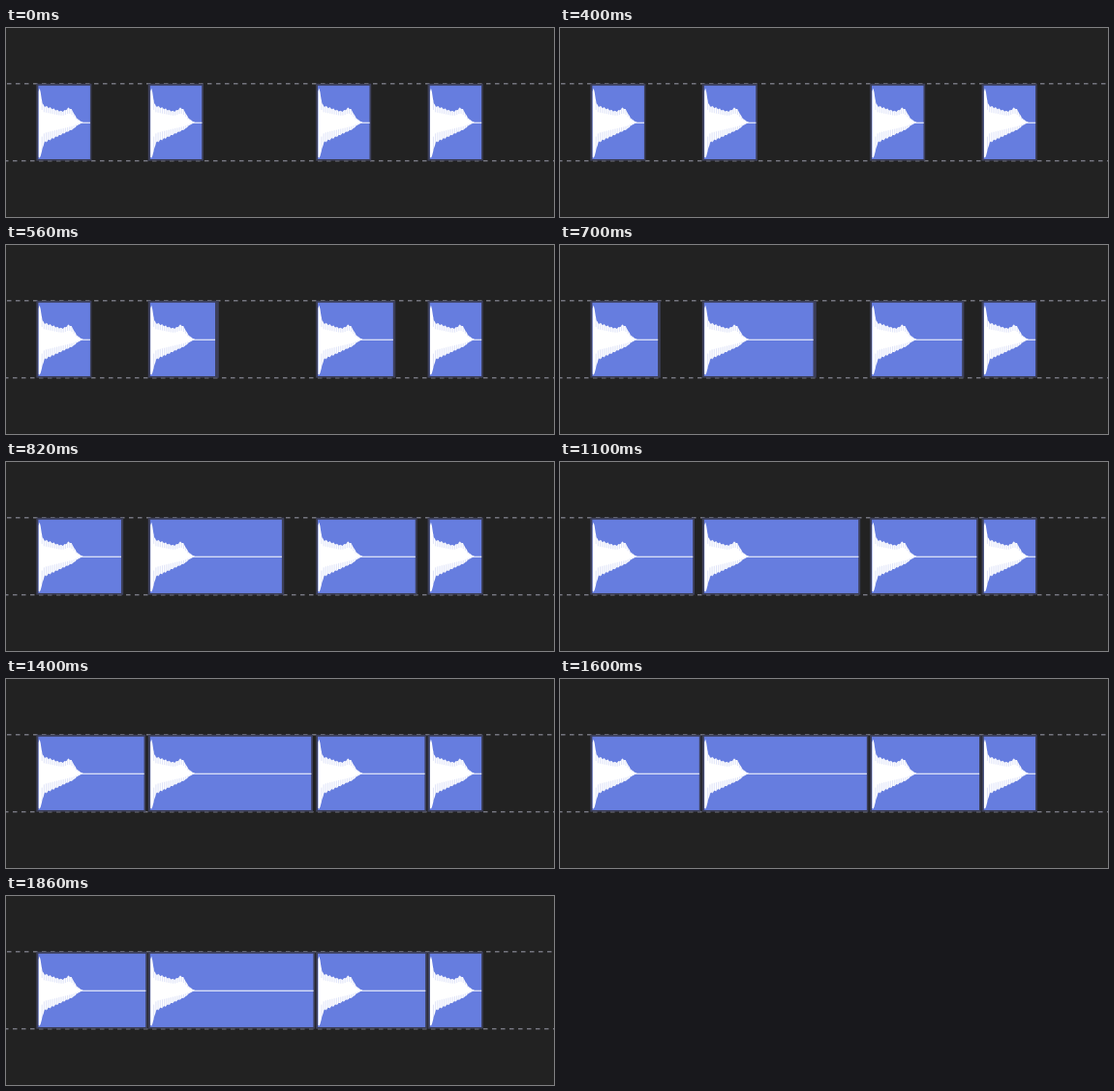
An HTML page for the animation above (2200 ms loop, 566x196 px).

```html
<!DOCTYPE html>
<html lang="en">
<head>
<meta charset="utf-8">
<title>Audio clips</title>
<style>
html, body { margin: 0; width: 100%; height: 100%; overflow: hidden; background: #222; }
svg { display: block; }
</style>
</head>
<body>
<svg id="stage" width="566" height="196" viewBox="0 0 566 196">
  <g stroke="#74757f" stroke-width="1.4" stroke-dasharray="4.5 4.5">
    <path d="M1 57.7H566"/>
    <path d="M-2 137.7H566"/>
  </g>
</svg>
<script>
const NS = 'http://www.w3.org/2000/svg';
const stage = document.getElementById('stage');
const LOOP = 2200, STEP = 20, SETTLED = 1860, LAG = 6;
const UNIT = 57.75, LEFT = 31, TOP = 59.5, HEIGHT = 76.5, MID = 98.2;
const BLUE = '#667ddf';

// slot: grid position, grow: extra units, start: when the stretch begins
const clips = [
  { slot: 0, grow: 1, start: 600 },
  { slot: 2, grow: 2, start: 500 },
  { slot: 5, grow: 1, start: 400 },
  { slot: 7, grow: 0, start: 0 }
];

function add(parent, tag, attrs) {
  const node = document.createElementNS(NS, tag);
  for (const key in attrs) node.setAttribute(key, attrs[key]);
  return parent.appendChild(node);
}

// Overdamped spring: soft start, long exponential settle
function spring(t) {
  const slow = 225, fast = 30;
  if (t <= 0) return 0;
  return 1 - (slow * Math.exp(-t / slow) - fast * Math.exp(-t / fast)) / (slow - fast);
}

// Drum hit: sharp attack, slow decay, a swell on the upper side
const bump = (x, centre, width) => Math.exp(-(((x - centre) / width) ** 2));
const taper = x => Math.max(0, Math.min(1, (47 - x) / 11));
const above = x => taper(x) * (20 - .34 * x + 16 * bump(x, 1, 2) + 6.5 * bump(x, 32, 5));
const below = x => taper(x) * (24 - .48 * x + 13 * bump(x, 1, 3));

function wavePath() {
  const upper = [], lower = [];
  for (let x = 0; x <= 50; x++) {
    const ripple = x > 3 ? .96 + .05 * Math.sin(x * 1.7) : 1;
    upper.push(`${x} ${-Math.max(.5, above(x) * ripple)}`);
    lower.unshift(`${x} ${Math.max(.5, below(x) * ripple)}`);
  }
  return `M${upper.join('L')}L170 -.5V.5L${lower.join('L')}Z`;
}

function groovePath() {
  let d = '';
  for (let x = 3.5; x < 42; x += 2.2) {
    d += `M${x} ${-above(x)}v${above(x) * .4}M${x} ${below(x) * .5}V${below(x)}`;
  }
  return d;
}

const wave = wavePath(), grooves = groovePath();
for (const clip of clips) {
  const x = LEFT + clip.slot * UNIT;
  clip.frame = add(stage, 'rect', { x: x + .3, y: 57.7, height: 80, fill: '#3c3f59' });
  clip.body = add(stage, 'svg', { x: x + 2.2, y: TOP, height: HEIGHT, overflow: 'hidden' });
  add(clip.body, 'rect', { width: '100%', height: HEIGHT, fill: BLUE });
  const art = add(clip.body, 'g', { transform: `translate(.5 ${MID - TOP})` });
  add(art, 'path', { d: wave, fill: '#fff' });
  add(art, 'path', { d: grooves, stroke: BLUE, 'stroke-width': .7, opacity: .3 });
}

function draw(time) {
  const t = Math.min(SETTLED, Math.floor((time % LOOP) / STEP) * STEP);
  for (const clip of clips) {
    const width = at => UNIT * (1 + clip.grow * spring(at - clip.start));
    clip.frame.setAttribute('width', width(t) - .6);
    clip.body.setAttribute('width', width(t - LAG) - 4);
  }
}

let origin = null;
function tick(now) {
  if (origin === null) origin = now;
  draw(now - origin);
  requestAnimationFrame(tick);
}
draw(0);
requestAnimationFrame(tick);
</script>
</body>
</html>
```
